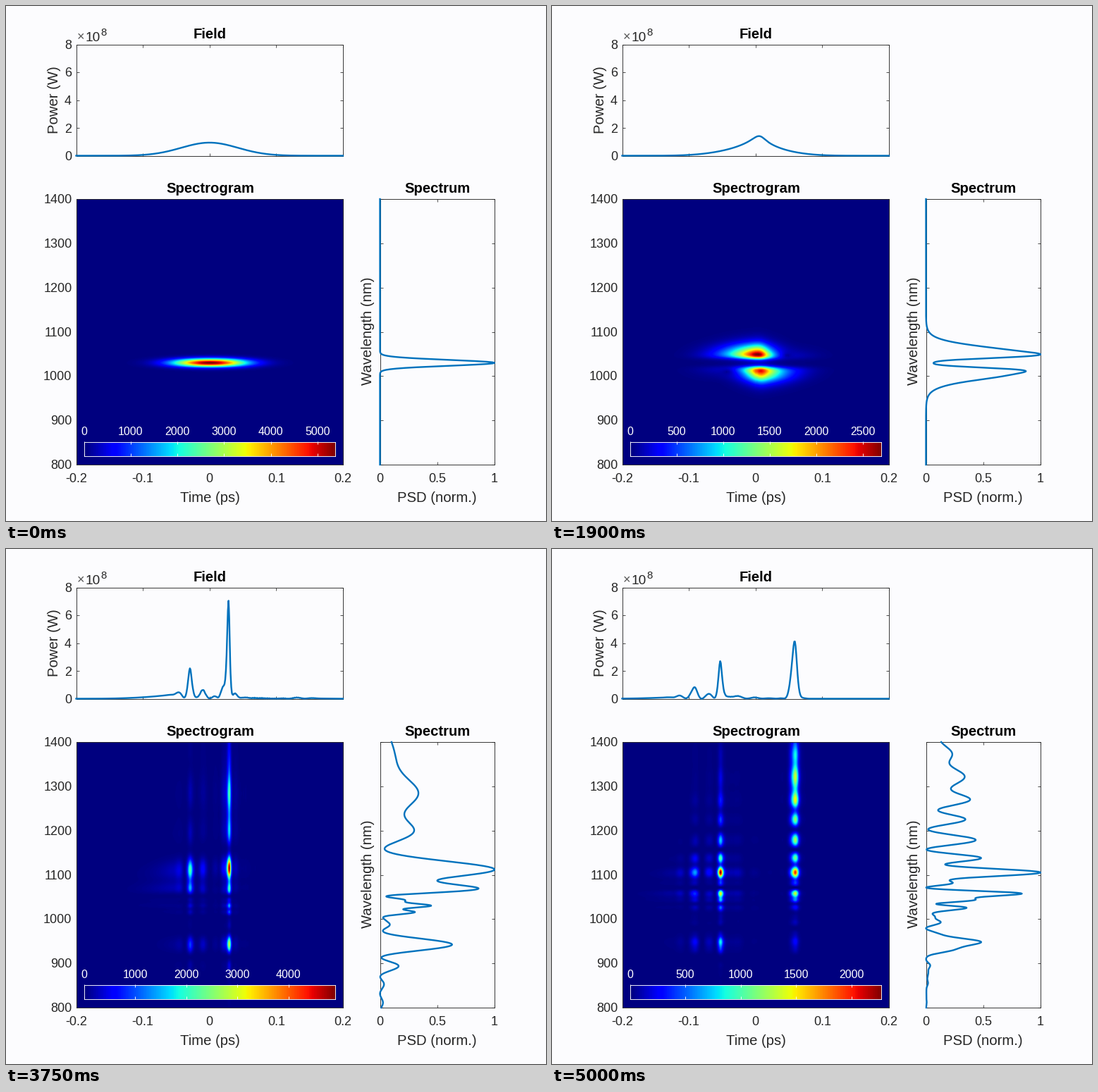
Write a matplotlib script that moves like this. It is 766x731 px and loops after 5.05 s.

```python
import numpy as np
import matplotlib.pyplot as plt
from matplotlib.animation import FuncAnimation
from matplotlib.collections import LineCollection

W, H, DPI = 766, 731, 64
FRAMES, STEP = 101, 50
PX = 72 / DPI
BACK, INK, BLUE = "#fcfcfe", "#262626", "#0072bd"

# Pulse: femtoseconds, nanometres, distance in nonlinear lengths
N = 4096
LIGHT, CARRIER = 299.792, 1030
W0 = 2 * np.pi * LIGHT / CARRIER
T0 = 100 / (2 * np.sqrt(np.log(2)))
POWER = 0.94
ORDER = 8.4
RAMAN = 0.2
BETA2 = -(T0 / ORDER) ** 2
BETA3 = -3 * BETA2 / W0
DZ, SAVES = 0.0125, 480
FOCUS_FRAME = 62
GATE = 25

plt.rcParams["font.family"] = "Liberation Sans"

t = np.arange(N) - N / 2
omega = 2 * np.pi * np.fft.fftfreq(N)
gain = np.clip(1 + omega / W0, 0, None)
half = np.exp(0.5j * DZ * (BETA2 / 2 * omega ** 2 + BETA3 / 6 * omega ** 3))


def kerr(s):
    """Kerr effect with self-steepening and a short Raman delay."""
    a = np.fft.fft(s)
    p = np.abs(a) ** 2
    slope = np.fft.fft(-1j * omega * np.fft.ifft(p)).real
    return 1j * DZ * gain * np.fft.ifft(a * (p - RAMAN * slope))


def advance(s):
    """One Runge-Kutta step in the interaction picture."""
    si = half * s
    k1 = half * kerr(s)
    k2 = kerr(si + k1 / 2)
    k3 = kerr(si + k2 / 2)
    k4 = kerr(half * (si + k3))
    return half * (si + k1 / 6 + k2 / 3 + k3 / 3) + k4 / 6


def propagate():
    s = np.fft.ifft(np.exp(-(t / T0) ** 2 / 2) + 0j)
    saved = [s]
    for _ in range(SAVES):
        s = advance(advance(s))
        saved.append(s)
    return np.array(saved)


spectra = propagate()
peaks = [np.max(np.abs(np.fft.fft(s))) for s in spectra]
focus = int(np.argmax(peaks[:300]))

wave = np.linspace(1400, 800, 1201)
pix_t = np.linspace(-200, 200, 378)
pix_w = np.linspace(1400, 800, 377)
gate_t = np.arange(-200, 201, 4)
near = np.abs(t) < 400
omega_up = np.fft.fftshift(omega)
gate_omega = np.fft.fftshift(2 * np.pi * np.fft.fftfreq(1024))


def detuning(nm):
    return 2 * np.pi * LIGHT / nm - W0


def density(s, nm):
    d = np.interp(detuning(nm), omega_up, np.fft.fftshift(np.abs(s) ** 2)) / nm ** 2
    return d / d.max()


def spectrogram(s, a, centre):
    """Gated spectrum, sharpened by the pulse and the full spectrum."""
    window = np.exp(-((t[near] - centre - gate_t[:, None]) / GATE) ** 2 / 2)
    g = np.abs(np.fft.ifft(window * a[near], 1024, axis=1)) ** 2
    g = np.fft.fftshift(g, axes=1)
    g = np.array([np.interp(detuning(pix_w), gate_omega, row) for row in g]).T
    g = np.array([np.interp(pix_t, gate_t, row) for row in g])
    p = np.interp(pix_t + centre, t, np.abs(a) ** 2)
    m = np.cbrt(g) * np.outer(density(s, pix_w), p)
    return m / m.max()


fig = plt.figure(figsize=(W / DPI, H / DPI), dpi=DPI, facecolor=BACK)


def panel(left, top, width, height, color=INK):
    ax = fig.add_axes([left / W, 1 - (top + height) / H, width / W, height / H],
                      facecolor=BACK)
    ax.tick_params(direction="in", length=4 * PX, width=.8 * PX, color=color, top=True,
                   right=True, labelbottom=False, labelleft=False)
    for side in ax.spines.values():
        side.set(color=color, linewidth=.9 * PX)
    return ax


field = panel(99.5, 54.5, 378.5, 158)
field.set(xlim=(-200, 200), ylim=(0, 8), xticks=range(-200, 201, 100), yticks=range(0, 9, 2))
gram = panel(99.5, 274, 378.5, 377)
gram.tick_params(length=0)
psd = panel(530.5, 274, 162.5, 377)
psd.set(xlim=(0, 1), ylim=(800, 1400), xticks=(0, .5, 1), yticks=range(800, 1401, 100))
bar = panel(110.5, 618.5, 356.5, 20, "white")
bar.imshow(np.linspace(0, 1, 357)[None], cmap="jet", aspect="auto")
bar.set(xticks=[], yticks=[])

image = gram.imshow(np.zeros((len(pix_w), len(pix_t))), cmap="jet", vmin=0, vmax=1,
                    aspect="auto", interpolation="nearest")
style = dict(color=BLUE, lw=2.4 * PX, zorder=3, clip_on=False)
pulse, = field.plot([], [], **style)
profile, = psd.plot([], [], **style)

# Overlay measured in pixels, for text and colour bar ticks
stage = fig.add_axes([0, 0, 1, 1], facecolor="none")
stage.axis("off")
stage.set(xlim=(0, W), ylim=(H, 0))


def label(x, y, text, size=18, ha="center", va="baseline", color=INK, **kw):
    return stage.text(x, y, text, fontsize=size * PX, ha=ha, va=va, color=color, **kw)


for x, y, text in ((289, 46, "Field"), (289.5, 265, "Spectrogram"), (612, 265, "Spectrum")):
    label(x, y, text, 20.2, color="black", weight="bold")
label(289.5, 703.5, "Time (ps)", 20.2)
label(611.5, 703.5, "PSD (norm.)", 20.2)
label(68, 133, "Power (W)", 20.2, va="center", rotation=90)
label(513.5, 461.5, "Wavelength (nm)", 20.3, va="center", rotation=90)
for k in range(5):
    label(93, 219 - 39.5 * k, str(2 * k), ha="right")
    label(99.5 + 94.6 * k, 675.5, f"{(k - 2) / 10:g}")
for k in range(7):
    label(93.5, 657 - 62.8 * k, str(800 + 100 * k), ha="right")
for k in range(3):
    label(530.5 + 81.3 * k, 675.5, f"{k / 2:g}")
label(100.5, 49.5, "×", ha="left", color="#555555")
label(112, 49.5, "10", 19, ha="left")
label(134.5, 41.5, "8", 15, ha="left")

numbers = [label(0, 609, "", 16, color="white") for _ in range(9)]
ticks = LineCollection([], colors="white", linewidths=.9 * PX)
stage.add_collection(ticks, autolim=False)

# Colour bar maximum over time
SCALE_MS = [0, 1100, 1900, 2450, 3150, 4300, 5000]
SCALE = np.log([5376, 3010, 2697, 4012, 8628, 2935, 2267])


def draw_scale(ms):
    top = np.exp(np.interp(ms, SCALE_MS, SCALE))
    step = 500 if top < 3500 else 1000 if top < 7000 else 2000
    values = np.arange(0, top, step)
    xs = 110.5 + 356.5 * values / top
    ticks.set_segments([[(x, a), (x, b)] for x in xs for a, b in ((618, 622), (635, 639))])
    for k, number in enumerate(numbers):
        number.set_text(f"{values[k]:.0f}" if k < len(values) else "")
        if k < len(values):
            number.set_x(xs[k])


def draw(n):
    s = spectra[min(round(n * focus / FOCUS_FRAME), SAVES)]
    a = np.fft.fft(s)
    p = np.abs(a) ** 2
    centre = np.sum(t * p) / np.sum(p)

    fs = np.linspace(-200, 200, 801)
    watts = POWER * np.interp(fs + centre, t, p)
    pulse.set_data(fs, np.where(watts > 8.05, np.nan, watts))
    profile.set_data(density(s, wave), wave)
    image.set_data(spectrogram(s, a, centre))
    draw_scale(n * STEP)
    return [pulse, profile, image, ticks, *numbers]


anim = FuncAnimation(fig, draw, frames=FRAMES, init_func=lambda: draw(0), interval=STEP,
                     repeat=True, repeat_delay=0, blit=False)
plt.show()
```
